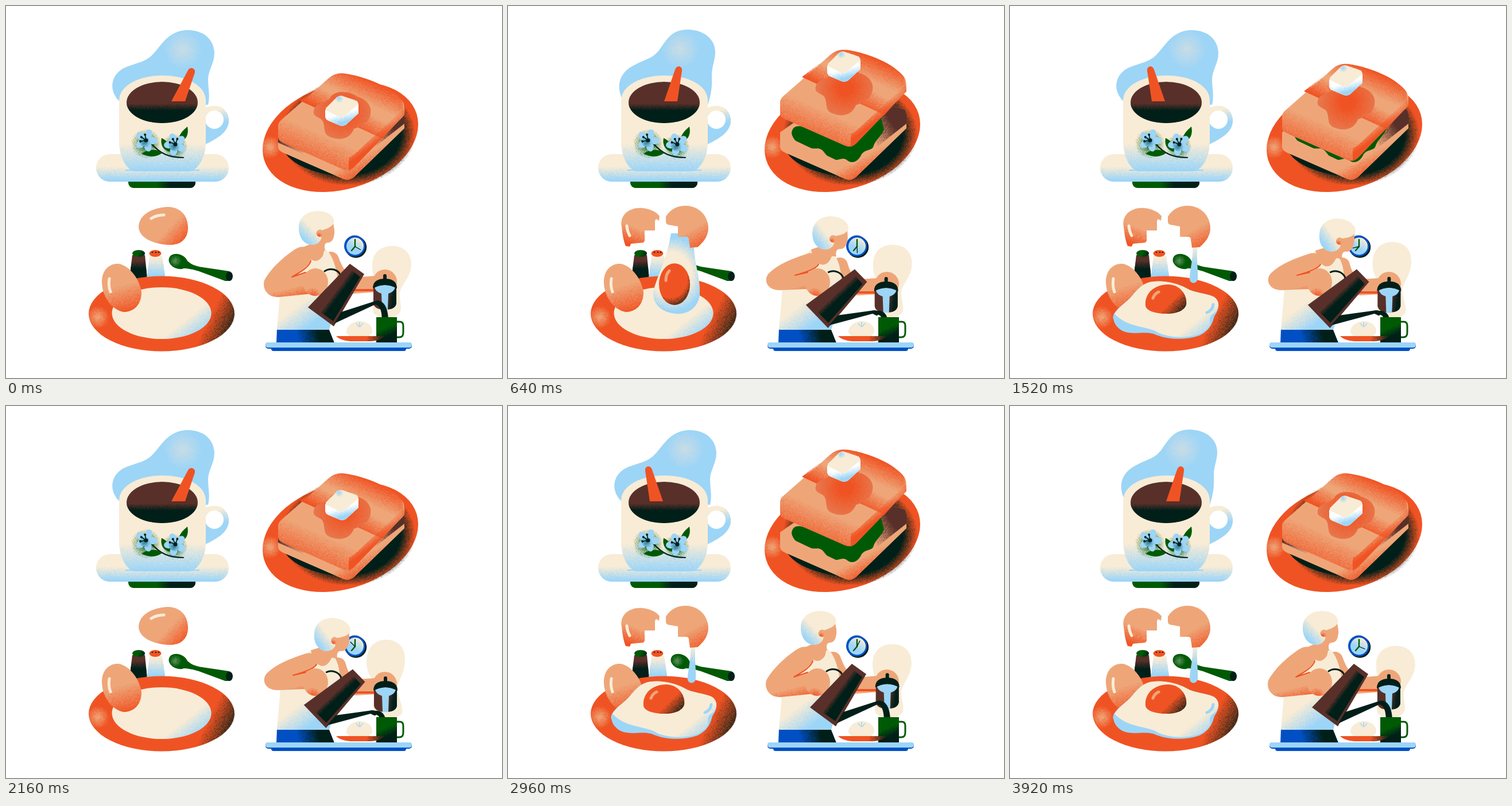
Animation of 864x648 px, one loop 4 s. Source, as an HTML page with a canvas:

```html
<!DOCTYPE html>
<html lang="en">
<head>
<meta charset="utf-8">
<title>Breakfast</title>
<style>
html, body { margin: 0; width: 864px; height: 648px; overflow: hidden; background: #fff; }
canvas { display: block; }
</style>
</head>
<body>
<canvas id="stage" width="864" height="648"></canvas>
<script>
const ctx = document.getElementById('stage').getContext('2d');
const CREAM = '#f8ecd6', SKY = '#9dd5f7', ORANGE = '#f05323', PEACH = '#eea679', BROWN = '#583029',
  DARK = '#001f19', GREEN = '#005a05', BLUE = '#0050c4', WHITE = '#ffffff';
const LOOP = 4000, STEP = 80;

// Shapes
const shape = d => typeof d === 'string' ? new Path2D(d) : d;
const oval = (x, y, rx, ry = rx, rot = 0) => {
  const p = new Path2D();
  p.ellipse(x, y, rx, ry, rot * Math.PI / 180, 0, 7);
  return p;
};
const box = (x, y, w, h, r = 0) => {
  const p = new Path2D();
  p.roundRect(x, y, w, h, r);
  return p;
};
const fill = (d, color) => { ctx.fillStyle = color; ctx.fill(shape(d)); };
const line = (d, color, width) => {
  ctx.strokeStyle = color;
  ctx.lineWidth = width;
  ctx.lineCap = ctx.lineJoin = 'round';
  ctx.stroke(shape(d));
};
const group = (draw, dx = 0, dy = 0, rot = 0, px = 0, py = 0, sx = 1, sy = 1) => {
  ctx.save();
  ctx.translate(px + dx, py + dy);
  ctx.rotate(rot * Math.PI / 180);
  ctx.scale(sx, sy);
  ctx.translate(-px, -py);
  draw();
  ctx.restore();
};

// Airbrush shading with a light grain, rendered once per gradient
const cache = new Map();
let seed = 7;
const rand = () => (seed = (seed * 16807) % 2147483647) / 2147483647;
function grain(x, y, make) {
  const c = document.createElement('canvas');
  c.width = 432; c.height = 336;
  const g = c.getContext('2d', { willReadFrequently: true });
  const ox = x < 432 ? 0 : 432, oy = y < 330 ? 0 : 312;
  g.translate(-ox, -oy);
  g.fillStyle = make(g);
  g.fillRect(ox, oy, 432, 336);
  const img = g.getImageData(0, 0, 432, 336);
  for (let i = 3; i < img.data.length; i += 4) {
    const a = img.data[i];
    img.data[i] = a * .75 + (a > rand() * 255 ? 64 : 0);
  }
  g.putImageData(img, 0, 0);
  return { c, ox, oy };
}
function tint(d, key, x, y, make) {
  if (!cache.has(key)) cache.set(key, grain(x, y, make));
  const s = cache.get(key);
  ctx.save();
  ctx.clip(shape(d));
  ctx.drawImage(s.c, s.ox, s.oy);
  ctx.restore();
}
const stops = (g, from, to) => { g.addColorStop(0, from); g.addColorStop(1, to); return g; };
const spray = (d, color, x0, y0, x1, y1) => tint(d, [color, x0, y0, x1, y1].join(), x0, y0,
  g => stops(g.createLinearGradient(x0, y0, x1, y1), color + '00', color));
const glow = (d, color, x, y, r, r0 = 0) => tint(d, [color, x, y, r, r0, 'glow'].join(), x, y,
  g => stops(g.createRadialGradient(x, y, r0, x, y, r), color, color + '00'));
const rim = (d, color, x, y, r0, r1) => tint(d, [color, x, y, r0, r1, 'rim'].join(), x, y,
  g => stops(g.createRadialGradient(x, y, r0, x, y, r1), color + '00', color));

// Motion
const ease = x => x * x * (3 - 2 * x);
function track(t, keys, curve = x => x) {
  let i = keys.findIndex(k => k[0] > t);
  if (i < 0) return keys[keys.length - 1][1];
  if (!i) return keys[0][1];
  const [t0, a] = keys[i - 1], [t1, b] = keys[i];
  return a + (b - a) * curve((t - t0) / (t1 - t0));
}
function morph(a, b, k) {
  const to = b.match(/[\d.]+/g);
  let i = 0;
  return a.replace(/[\d.]+/g, n => +n + (to[i++] - n) * k);
}

// Coffee cup
const steams = [
  ['M198 160C188 135 196 116 218 104C240 92 252 92 264 76C278 56 286 41 314 41C344 42 361 60 361 80C361 96 354 106 355 126C356 145 352 160 348 172Z', 300, 75],
  ['M200 168C178 150 180 118 210 106C228 99 240 98 252 88C270 72 280 42 318 42C350 43 363 64 363 82C363 100 352 112 352 128C352 145 356 155 352 172Z', 308, 76],
  ['M200 172C178 150 180 116 206 100C226 88 250 84 272 74C292 62 306 45 332 45C358 46 373 64 373 86C373 104 358 116 360 134C361 150 354 165 348 175Z', 325, 83]
];
const steamOrder = [1, 0, 1, 2, 1, 0];

function flower(x, y, turn) {
  for (let i = 0; i < 5; i++) group(() => fill(oval(x, y - 11, 6.5, 9), SKY), 0, 0, turn + i * 72, x, y);
  glow(oval(x, y, 12), '#2d7f96', x - 3, y + 4, 11);
  for (let i = 0; i < 3; i++) group(() => {
    line(`M${x} ${y}L${x} ${y - 10}`, DARK, 1.6);
    fill(oval(x, y - 10, 2), DARK);
  }, 0, 0, turn - 120 + i * 45, x, y);
  fill(oval(x, y, 3.5), DARK);
}

function stirrer(i) {
  const pose = [0, 1, 2, 3, 2, 1][i % 6], outer = pose === 0 || pose === 3;
  const d = outer ? 'M288 166L317 112Q319 108 324 108Q330 110 329 116L312 166Z'
    : 'M272 166L291 111Q293 105 298 105Q304 107 303 113L295 166Z';
  group(() => fill(d, ORANGE), 0, 0, 0, 271, 0, pose > 1 ? -1 : 1);
}

function cup(t) {
  const [steam, hx, hy] = steams[steamOrder[Math.floor(t / 333.4) % 6]];
  fill(steam, SKY);
  glow(steam, '#c9dce4', hx, hy, 34);
  const saucer = box(157, 258, 231, 48, 24);
  fill(box(213, 296, 117, 21, 9), GREEN);
  spray(box(213, 296, 117, 21, 9), DARK, 262, 310, 286, 310);
  fill(saucer, CREAM);
  spray(saucer, SKY, 0, 280, 0, 303);
  const handle = 'M346 178C372 166 388 182 388 200C388 220 366 232 347 241Z';
  fill(handle, CREAM);
  spray(handle, SKY, 362, 182, 368, 206);
  fill(oval(363, 198, 16), WHITE);
  const body = 'M197 165C197 137 235 121 272 121C312 121 348 137 348 165L348 235C348 265 335 283 322 288L222 288C208 282 197 262 197 235Z';
  fill(body, CREAM);
  spray(body, SKY, 0, 240, 0, 286);
  line('M208 286L336 286', SKY, 2);
  const coffee = oval(272, 168, 62, 36);
  fill(coffee, BROWN);
  spray(coffee, DARK, 0, 170, 0, 182);
  stirrer(Math.floor((t + 16) / (LOOP / 12)));
  glow(oval(244, 240, 26), GREEN, 244, 240, 26);
  glow(oval(294, 245, 24), GREEN, 294, 245, 22);
  line('M252 238C268 258 285 264 309 264', DARK, 2.2);
  fill('M300 239C299 225 308 217 316 210C319 224 314 234 300 239Z', GREEN);
  fill('M286 254C272 251 269 240 271 230C282 235 287 244 286 254Z', GREEN);
  fill('M272 256C262 264 248 264 236 257C248 249 262 248 272 256Z', GREEN);
  flower(244, 234, 20);
  flower(295, 241, 50);
}

// Toast
function butter() {
  const all = 'M557 178L576 159Q581 155 587 157L608 164Q614 166 614 172L614 187L592 207Q587 210 581 208L562 200Q556 197 556 192Z';
  fill(all, CREAM);
  glow(all, SKY, 580, 161, 8);
  const side = 'M556 181L580 193Q585 195 589 192L614 171L614 187L592 207Q587 210 581 208L562 200Q556 197 556 192Z';
  fill(side, WHITE);
  spray(side, SKY, 582, 188, 586, 203);
}

function slice() {
  const all = 'M474 209Q474 203 480 198L562 126Q574 115 592 118C630 124 672 142 690 165Q694 170 694 180L694 190L606 281Q597 289 586 284L482 238Q474 234 474 228Z';
  fill(all, PEACH);
  const back = 'M512 165L562 126Q574 115 592 118C630 124 672 142 690 165L694 190L656 231Z';
  spray(back, ORANGE, 606, 160, 622, 124);
  spray(back, ORANGE, 604, 172, 588, 202);
  const front = 'M474 209Q474 203 480 198L512 165L656 231L606 281Q597 289 586 284L482 238Q474 234 474 228Z';
  spray(front, ORANGE, 555, 225, 528, 285);
  const edge = 'M597 264Q603 262 606 259L694 178L694 190L606 281L597 287Z';
  spray(edge, ORANGE, 640, 218, 652, 234);
  const melt = 'M536 182C540 166 560 170 566 158C574 146 600 148 612 158C628 162 640 176 634 192C630 206 616 210 606 214C600 230 584 236 564 228C550 222 558 208 550 198C542 192 534 192 536 182Z';
  fill(melt, '#e8764b');
  glow(melt, ORANGE, 588, 184, 48, 12);
}

function toast(t) {
  const lift = track(t, [[160, 0], [240, 9], [320, 27], [400, 36], [560, 41], [1120, 42], [1280, 38], [1440, 25], [1600, 8], [1720, 0]]);
  const hop = track(t, [[80, 0], [160, 10], [240, 48], [320, 73], [560, 77], [1200, 77], [1440, 70], [1600, 36], [1760, 0]]);
  const plate = oval(582.5, 228, 138.7, 91.3, -16.5);
  fill(plate, ORANGE);
  glow(plate, PEACH, 460, 246, 20);
  group(() => glow(oval(596, 222, 120), DARK, 596, 222, 117, 92), 0, 0, 0, 596, 222, 1, .78);
  fill('M484 250C490 270 525 290 578 296L500 246Z', DARK);
  const base = 'M474 220L580 146L690 180Q694 182 694 190L694 213L606 298Q597 305 587 301L482 255Q474 251 474 245Z';
  fill(base, PEACH);
  spray(base, BROWN, 625, 222, 664, 196);
  fill('M494 222C495 207 508 207 520 213L640 160L655 215C650 228 640 232 636 246C632 252 622 250 616 258C610 272 598 276 590 268C580 262 574 272 564 267C552 262 552 250 540 248C520 250 498 240 494 222Z', GREEN);
  const crust = 'M474 222L588 276Q597 280 606 274L694 205L694 213L606 298Q597 305 587 301L482 255Q474 251 474 245Z';
  fill(crust, PEACH);
  spray(crust, ORANGE, 585, 280, 600, 308);
  if (lift < 12) spray('M474 226L597 283L590 290L474 238Z', BROWN, 510, 262, 490, 226);
  group(slice, 0, -lift);
  group(butter, 0, -hop);
}

// Eggs
function shell(d, x0, y0, x1, y1) {
  fill(d, PEACH);
  spray(d, ORANGE, x0, y0, x1, y1);
}

function shakers() {
  const pepper = 'M220 434L242 434L246 476L215 476Z', salt = 'M250 435L272 435L278 476L245 476Z';
  fill(pepper, BROWN);
  spray(pepper, DARK, 0, 444, 0, 458);
  fill(oval(231, 431, 11, 6), GREEN);
  spray(oval(231, 431, 11, 6), DARK, 231, 430, 242, 434);
  fill(salt, CREAM);
  spray(salt, SKY, 0, 440, 0, 468);
  fill(oval(260, 431, 10.5, 6), ORANGE);
  for (const x of [255, 261, 266]) fill(oval(x, 429, 1.4, 1), DARK);
  fill('M312 440C320 449 328 453 342 455L389 462Q396 465 394 472Q391 480 382 479L336 462C326 459 318 457 306 457Z', GREEN);
  fill(oval(300, 445, 17, 12.5, 22), GREEN);
  glow(oval(300, 445, 17, 12, 22), '#5d9060', 295, 444, 11);
  fill(oval(389, 471, 6, 8), DARK);
}

function halvesNew() {
  fill(oval(280, 403, 11, 20), ORANGE);
  const goo = 'M272 410L290 405L294 425C302 436 302 455 290 462C280 474 262 476 248 473C245 450 268 440 272 410Z';
  fill(goo, '#f2f0e6');
  spray(goo, SKY, 276, 425, 284, 466);
  shell('M207 382C207 362 224 352 246 352L264 352L261 362L268 372L258 379L262 390L250 396L254 408L243 414L243 424L230 419C215 412 207 398 207 382Z', 226, 395, 232, 425);
  shell('M272 358C280 350 290 349 300 349C322 352 334 370 334 392C334 410 322 424 306 426L292 426L291 412L281 403L285 390L273 378L282 368Z', 308, 405, 318, 440);
  line('M219 395Q223 402 229 406', CREAM, 5);
}

function drop() {
  const white = 'M284 396L318 396L324 420C326 445 335 465 334 488C332 508 315 518 296 518C272 517 254 507 253 488C254 470 276 440 284 396Z';
  fill(white, CREAM);
  rim(white, SKY, 286, 458, 34, 56);
  const yolk = oval(290, 473, 27, 31.5);
  fill(yolk, ORANGE);
  rim(yolk, DARK, 282, 464, 30, 48);
  line('M275 467Q275 458 281 453', PEACH, 5);
}

function halvesOpen() {
  shell('M198 384C194 364 212 350 234 352C246 353 258 358 264 366L263 374L258 371L256 374L256 391L238 391L238 409L236 412L214 414L212 419L205 418C200 405 199 392 198 384Z', 222, 385, 210, 415);
  shell('M275 367C282 354 296 347 312 348C336 350 349 368 349 388C348 402 340 412 330 420L317 421L315 407Q315 402 310 402L296 402L296 384L279 381Q275 380 275 375Z', 318, 390, 338, 425);
  line('M207 383Q208 393 212 400', CREAM, 5);
}

function fried() {
  const white = 'M180 545C176 535 196 520 206 512C218 500 224 488 240 482C262 476 290 482 308 492C322 500 340 500 354 506C368 514 364 530 356 540C352 556 346 566 330 574C300 584 270 580 250 571C230 566 215 574 196 566C186 560 182 554 180 545Z';
  fill(white, SKY);
  const top = 'M182 536C190 524 200 518 206 512C218 500 224 488 240 482C262 476 290 482 308 492C322 500 340 500 354 506C368 514 364 530 354 536C342 544 354 552 344 562C325 580 285 580 260 570C240 556 205 562 182 536Z';
  fill(top, CREAM);
  spray(top, SKY, 335, 540, 356, 566);
  const yolk = 'M236 522C234 500 252 485 276 485C298 486 309 505 307 520C304 532 286 537 268 536C250 535 237 530 236 522Z';
  fill(yolk, ORANGE);
  spray(yolk, DARK, 282, 514, 304, 536);
  line('M249 509Q252 501 259 498', PEACH, 5);
  line('M343 534Q353 530 354 520', SKY, 5);
}

function eggs(t) {
  const done = t >= 720;
  shakers();
  const plate = oval(271, 536, 127, 65.5);
  fill(plate, ORANGE);
  spray(plate, DARK, 348, 556, 396, 580);
  glow(plate, PEACH, 160, 542, 20);
  if (!done) {
    const dish = oval(271, 535, 86.5, 45);
    fill(dish, CREAM);
    spray(dish, SKY, 308, 550, 330, 578);
  }
  const left = 'M167 478C168 458 182 448 196 449C216 452 234 478 236 500C235 522 222 532 206 533C184 530 166 505 167 478Z';
  shell(left, 203, 486, 216, 534);
  line('M180 475Q178 488 182 498', CREAM, 5);
  if (t < 240) {
    const whole = 'M231 384C232 360 262 350 284 350C306 352 317 366 317 388C316 406 304 416 286 416C262 416 231 406 231 384Z';
    shell(whole, 284, 386, 312, 412);
    line('M253 370Q262 364 275 364', CREAM, 5);
  } else if (t < 400) {
    halvesNew();
  } else {
    if (!done) {
      const k = track(t, [[400, .6], [480, .84], [560, 1], [640, 1.15]]);
      group(drop, 0, 0, 0, 290, 396, Math.min(1, .3 + .7 * k), k);
    } else {
      const drip = 'M319 418L326 418C325 445 328 465 327 475C326 484 315 485 313 477C312 468 319 440 319 418Z';
      fill(drip, SKY);
      spray(drip, CREAM, 0, 450, 0, 420);
    }
    halvesOpen();
    if (done) {
      const squash = track(t, [[720, .08], [800, -.02], [880, 0]]);
      group(fried, 0, 0, 0, 271, 540, 1 + squash / 2, 1 - squash);
    }
  }
}

// Cook
function clock(t) {
  fill(oval(609.5, 420, 18.7), DARK);
  fill(oval(607.5, 418, 18.5), BLUE);
  fill(oval(608, 418.5, 15), SKY);
  spray(oval(608, 418.5, 15), CREAM, 606, 422, 616, 406);
  line('M608 419L608 407M608 419L602 426', GREEN, 2.4);
  group(() => line('M608 419L608 408', DARK, 1.3), 0, 0, 120 + t / LOOP * 360, 608, 419);
}

function press() {
  const body = 'M640 486L680 486L680 518Q678 529 660 529Q642 529 640 518Z';
  fill(body, BROWN);
  spray(body, DARK, 664, 500, 676, 502);
  fill('M642 490Q660 482 678 490Q676 498 666 501L665 529L655 529L654 501Q644 498 642 490Z', SKY);
  fill('M639 492Q639 475 660 475Q681 475 681 492Q670 486 660 486Q650 486 639 492Z', DARK);
  line('M660 470L660 480', DARK, 6);
}

function pot() {
  line('M555 462Q562 457 571 459Q580 462 582 468', DARK, 3);
  fill('M599 449L624 467L571 558L526 525Z', BROWN);
  const inner = 'M603 461L617 472L570 549L549 534Z';
  fill(inner, DARK);
  spray(inner, BROWN, 584, 500, 576, 494);
  fill('M572 553L584 533L640 515Q650 511 656 517L651 522L643 520Z', DARK);
}

function head() {
  const face = 'M530 388L570 376C570 382 573 390 572 396C571 406 568 411 562 412C556 412 553 416 556 426L530 426L530 400Z';
  fill(face, PEACH);
  const hair = 'M510 385C510 368 525 357 543 357C562 357 574 368 571 378C566 388 554 388 546 393C554 402 548 416 532 416C516 414 510 400 510 385Z';
  fill(hair, CREAM);
  spray(hair, SKY, 530, 384, 514, 400);
  fill(oval(547, 396, 6.5), PEACH);
  glow(oval(547, 396, 6), ORANGE, 545, 400, 6);
}

function cook(t) {
  const lean = track(t, [[0, 0], [1000, 1], [2000, 1], [3000, 0]], ease);
  const tip = track(t, [[0, 0], [640, 1], [2160, 1], [2560, -.05], [3000, 0]], ease);
  const drift = track(t, [[0, 0], [320, .08], [1120, .4], [2160, 1], [2560, .4], [3440, .15], [4000, 0]]);
  fill(morph(
    'M638 452C638 430 652 418 673 418C694 418 706 432 706 450C706 472 688 485 686 500C685 512 690 522 687 532C680 546 650 546 640 535C636 520 644 500 642 480C640 470 638 464 638 452Z',
    'M628 446C628 422 642 407 662 407C682 407 695 420 695 440C695 470 680 480 682 495C684 510 692 522 690 535C684 546 650 546 641 535C637 520 644 500 640 480C632 468 628 460 628 446Z', drift), CREAM);
  clock(t);

  const sway = keys => track(t, keys, ease);
  const px = sway([[0, 0], [320, -2], [1120, 0], [2160, 1], [2560, 2], [3440, -1], [4000, 0]]);
  const py = sway([[0, 0], [320, 5], [1120, 5], [2160, 4], [2560, -3], [3440, 0], [4000, 0]]);
  line(morph('M566 442Q580 482 606 487L645 484', 'M578 452Q588 488 610 490L645 488', tip), PEACH, 28);
  line(morph('M590 495L645 495', 'M594 499L645 499', tip), ORANGE, 4);
  fill(oval(660, 480 + 4 * tip, 21), PEACH);
  group(press, px, py);

  const pants = 'M472 562L562 562L572 587L471 587Z';
  fill(pants, BLUE);
  spray(pants, DARK, 508, 580, 545, 572);
  const shirt = morph(
    'M478 492L500 436L518 420C526 448 552 452 553 420L563 430C574 446 582 480 578 510L563 564L472 564Z',
    'M478 492L512 444L532 426C538 458 562 462 564 430L574 440C584 456 584 488 578 514L563 564L472 564Z', lean);
  const chest = morph('M518 420C526 450 552 454 555 420L540 410Z', 'M532 426C538 460 564 464 570 430L552 420Z', lean);
  fill(shirt, CREAM);
  spray(shirt, SKY, 518, 515, 542, 548);
  fill(chest, PEACH);
  line(morph('M544 408L541 430', 'M568 418L555 438', lean), PEACH, 24);
  group(head, 29 * lean, 13 * lean, 9 * lean, 541, 386);

  const arm = morph(
    'M505 423C520 414 535 424 532 440C530 452 508 466 498 472L530 462L542 500L475 507C455 508 446 492 450 478C462 455 490 432 505 423Z',
    'M520 432C534 427 546 436 541 450C536 460 510 465 500 469L530 462L542 492L475 495C452 496 444 478 454 466C470 450 495 440 520 432Z', tip);
  fill(arm, PEACH);
  spray(arm, ORANGE, 500, 490, 506, 514);
  line(morph('M531 444C528 456 508 466 498 472L522 464', 'M541 450C536 460 510 466 500 469L522 464', tip), ORANGE, 2);
  fill(oval(539, 481, 22, 24), PEACH);
  glow(oval(539, 481, 22, 24), ORANGE, 534, 506, 16);

  fill(morph('M643 514C656 511 665 522 666 545L655 545C654 530 652 524 645 520Z',
    'M638 532C650 528 659 534 661 545L650 545C650 539 648 538 640 537Z', tip), DARK);
  group(pot, 0, 0, 10 * tip, 547, 482);

  line('M681 550L686 550Q692 550 692 557L692 569Q692 577 685 577L681 577', GREEN, 3);
  fill(box(645, 542, 36, 45), GREEN);
  spray(box(645, 542, 36, 45), DARK, 658, 562, 664, 576);
  const bun = 'M593 566C594 556 606 549 616 549C628 549 638 556 638 566C638 572 632 576 626 576L604 576C598 576 593 572 593 566Z';
  fill(bun, CREAM);
  spray(bun, SKY, 0, 560, 0, 576);
  line('M616 551L616 559M610 553Q613 555 614 558M622 553Q619 555 618 558', SKY, 1.5);
  const dish = 'M575 575L658 575C650 583 640 584 630 584L600 584C588 583 580 580 575 575Z';
  fill(dish, ORANGE);
  spray(dish, DARK, 628, 578, 660, 584);
  fill(box(462, 592, 235, 9, 4), BLUE);
  fill(box(452, 586, 255, 11, 5), BLUE);
  fill(box(452, 586, 255, 9, 4.5), SKY);
}

function frame() {
  const t = Math.floor(performance.now() % LOOP / STEP) * STEP;
  ctx.fillStyle = WHITE;
  ctx.fillRect(0, 0, 864, 648);
  cup(t);
  toast(t % 2000);
  eggs(t % 2000);
  cook(t);
  requestAnimationFrame(frame);
}
frame();
</script>
</body>
</html>
```
